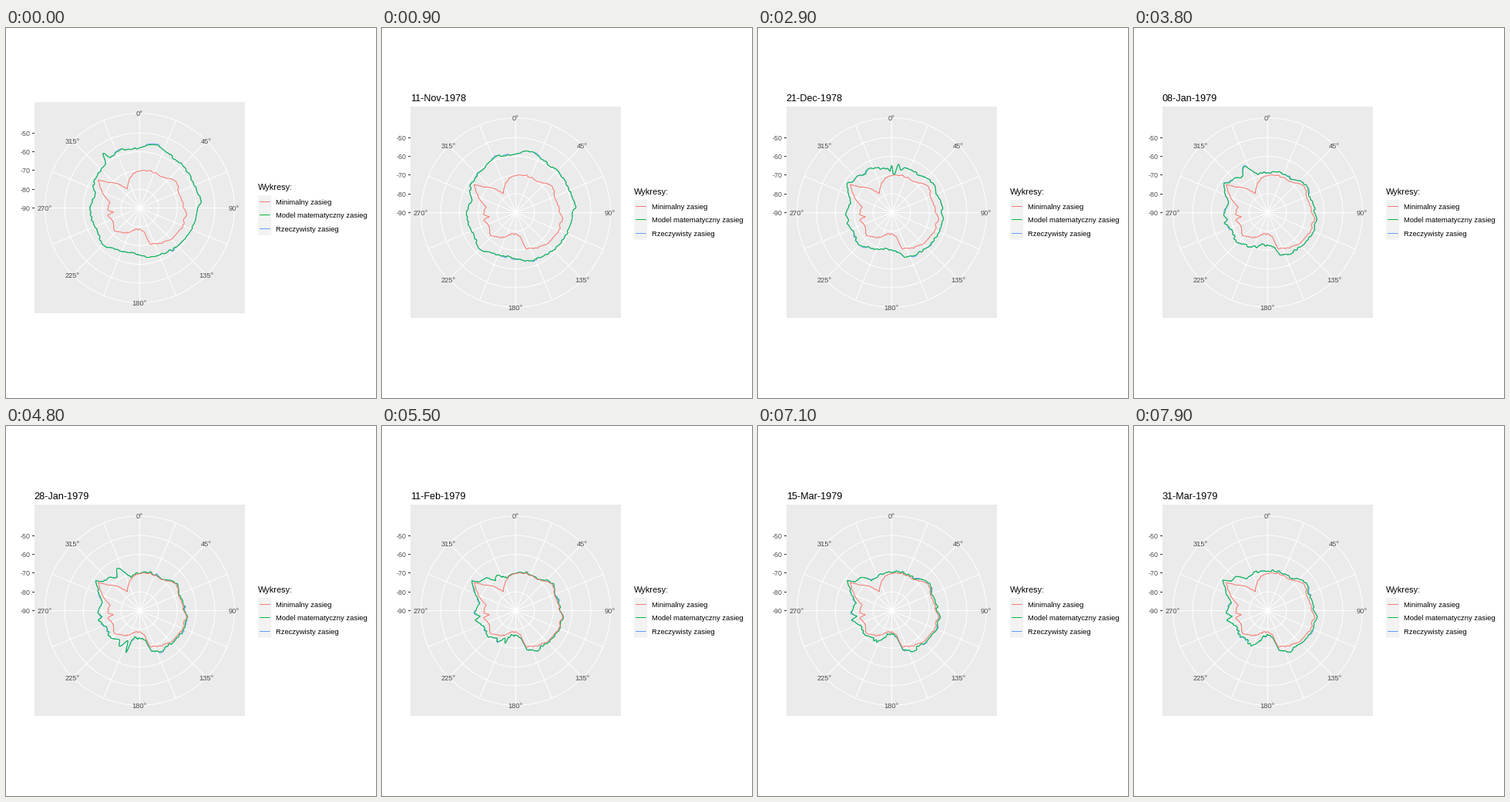
Recreate the animation shown at these times as a matplotlib script. Size 480x480 px, loop 8000 ms.

```python
import numpy as np
import matplotlib.pyplot as plt
from matplotlib.animation import FuncAnimation
from matplotlib.patches import Rectangle, Circle
from matplotlib.transforms import Affine2D

SIZE, DPI = 480, 96
FRAMES, STEP = 80, 100
PX = 72 / DPI
CX, CY = 173.5, 239.5
STEP_R, OUTER = 24.35, 122.85
RED, GREEN, BLUE = "#F8766D", "#00BA38", "#619CFF"
MONTHS = "Jan Feb Mar Apr May Jun Jul Aug Sep Oct Nov Dec".split()
START = np.datetime64("1978-10-24")

plt.rcParams["font.family"] = "Liberation Sans"

deg = np.arange(361)
theta = np.radians(deg)
rng = np.random.default_rng(11)


def jag(gen, amp, width=3):
    """Closed step-like roughness around the ring."""
    steps = gen.uniform(-amp, amp, 360 // width)
    return np.append(np.repeat(steps, width), steps[0])


def bump(centre, width):
    d = (deg - centre + 180) % 360 - 180
    return np.exp(-(d / width) ** 2)


def wave(peak):
    return np.cos(theta - np.radians(peak))


def smooth(x):
    x = np.clip(x, 0, 1)
    return x * x * (3 - 2 * x)


def polar(r):
    return CX + r * np.sin(theta), CY - r * np.cos(theta)


# Minimal range through a few (angle, radius) corners
corners = [(0, 48.5), (15, 50), (35, 49), (53, 58), (60, 57), (68, 54),
           (90, 57), (97, 62), (104, 59), (110, 61), (136, 57), (164, 48.5),
           (169, 32), (180, 28), (191, 28), (209, 37), (228, 44), (245, 38),
           (257, 43), (261, 35), (266, 42), (281, 39), (304, 65), (309, 52),
           (317, 44), (326, 29.5), (350, 46)]
low = np.interp(deg, *zip(*corners), period=360) + jag(rng, 0.7)

# The range shrinks from the autumn ring to the winter ring
autumn = (70 + 8 * wave(40) + 7 * bump(13, 13) + 4 * bump(83, 5)
          - 4 * bump(190, 14) + 5 * bump(225, 9) - 6 * bump(285, 10)
          + 5 * bump(340, 11))
winter = (low + 1 + 6 * bump(153, 8) + 9 * bump(265, 25)
          + 14 * bump(321, 12))
shrink_time = 60 - 12 * wave(45)
rough = jag(rng, 0.9)

# Passing bulges: angle, width, height, middle of life, half life
bulges = [(326, 2, 13, 0, 3), (5, 9, -13, 29, 7), (0, 1.5, 11, 29, 5),
          (8, 2.5, 12, 29, 5), (333, 7, 21, 44, 14), (198, 2, 18, 48, 8),
          (209, 4, 9, 48, 9), (203, 13, 12, 82, 14), (337, 14, 9, 80, 14)]


def model(k):
    fade = 1 - smooth(k / shrink_time)
    r = winter + (autumn - winter) * fade
    for angle, width, height, mid, half in bulges:
        r = r + height * bump(angle, width) * np.exp(-((k - mid) / half) ** 2)
    r = r + 2 * smooth((k - 63) / 16) + rough
    return np.maximum(r + jag(np.random.default_rng(k), 0.5), low + 0.3)


def real(r, k):
    """Model with a few short stretches pushed outwards."""
    patch = np.random.default_rng(k + FRAMES).random(60) < 0.13
    push = np.repeat(patch, 6) * 1.2
    return r + np.append(push, push[0])


fig = plt.figure(figsize=(SIZE / DPI, SIZE / DPI), dpi=DPI, facecolor="white")
ax = fig.add_axes([0, 0, 1, 1])
ax.set(xlim=(0, SIZE), ylim=(SIZE, 0))
ax.axis("off")

shift = Affine2D()
place = shift + ax.transData


def line(x, y, color, width=1.0, z=3):
    return ax.plot(x, y, color=color, lw=width * PX, transform=place,
                   zorder=z, snap=False, solid_capstyle="butt")[0]


def box(x, y, w, h, color):
    ax.add_patch(Rectangle((x, y), w, h, fc=color, ec="none", snap=False,
                           transform=place, zorder=1))


def label(x, y, s, size, color="black", ha="left"):
    return ax.text(x, y, s, fontsize=size * PX, color=color, ha=ha,
                   va="baseline", transform=place, zorder=6)


# Panel and grid
box(37, 102, 273, 274, "#EBEBEB")
for r in [STEP_R * i for i in range(1, 5)] + [OUTER]:
    ax.add_patch(Circle((CX, CY), r, fill=False, ec="white", lw=PX,
                        snap=False, transform=place, zorder=2))
for a in np.radians(np.arange(0, 360, 22.5)):
    line([CX, CX + OUTER * np.sin(a)], [CY, CY - OUTER * np.cos(a)],
         "white", z=2)

# Axis labels
for i, value in enumerate(range(-90, -49, 10)):
    y = np.floor(CY - STEP_R * i) + 0.5
    line([34, 37], [y, y], "#333333")
    label(31.7, y + 3.5, str(value), 8.9, "#4D4D4D", "right")
for d in range(0, 360, 45):
    a = np.radians(d)
    label(CX - 0.4 + OUTER * np.sin(a), CY + 3.5 - OUTER * np.cos(a),
          f"{d}°", 9.2, "#4D4D4D", "center")

# Legend
label(327, 216, "Wykresy:", 11)
names = ["Minimalny zasieg", "Model matematyczny zasieg", "Rzeczywisty zasieg"]
for i, (name, color) in enumerate(zip(names, [RED, GREEN, BLUE])):
    y = 231.5 + 17.28 * i
    box(327, y - 8.64, 17.28, 17.28, "#F2F2F2")
    row = np.floor(y) + 0.5
    line([329, 342.5], [row, row], color)
    label(350, y + 3.5, name, 9.4)

# Curves
real_line = line([], [], BLUE, z=3)
model_line = line([], [], GREEN, z=4)
line(*polar(low), RED, z=5)
title = label(36.6, 95, "", 12.6)


def date_text(k):
    year, month, day = str(START + 2 * k).split("-")
    return f"{day}-{MONTHS[int(month) - 1]}-{year}"


def draw(k):
    # The untitled opening frame sits a little higher
    shift.clear().translate(0, -6 if k == 0 else 0)
    title.set_text(date_text(k) if k else "")
    r = model(k)
    model_line.set_data(*polar(r))
    real_line.set_data(*polar(real(r, k)))
    return model_line, real_line, title


anim = FuncAnimation(fig, draw, frames=FRAMES, interval=STEP, repeat=True,
                     repeat_delay=0, blit=False)
plt.show()
```
